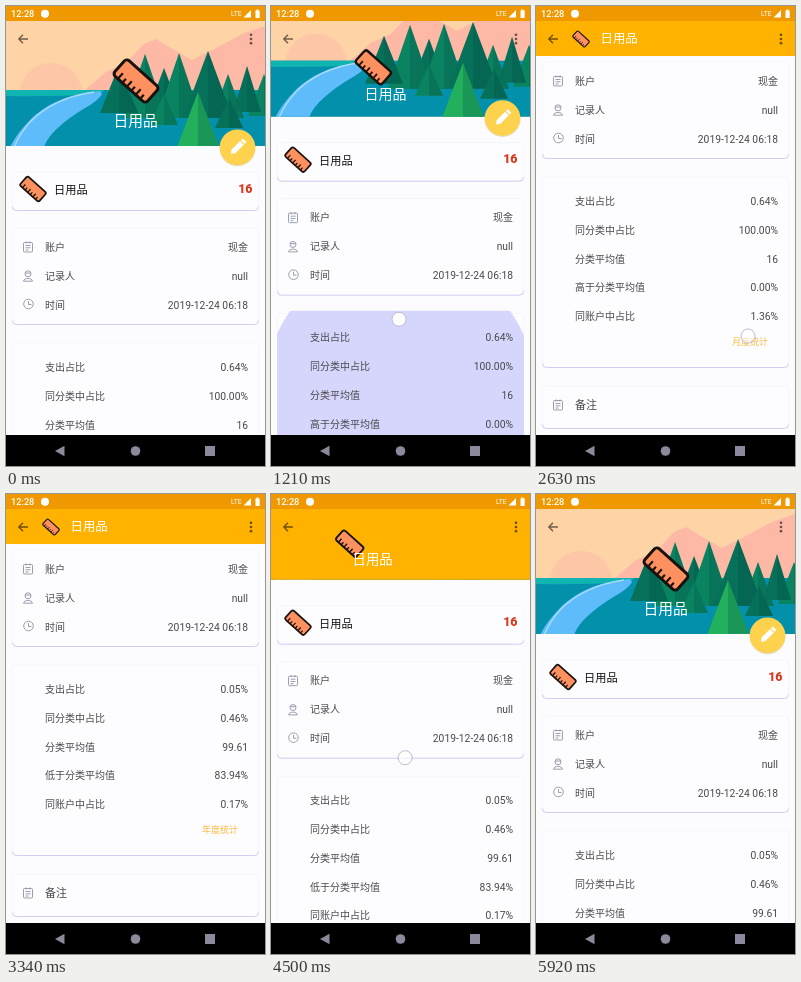
Recreate the animation shown at these times as an HTML page. Size 259 px wide and 460 px high, loop 5.96 s.

```html
<!DOCTYPE html>
<html lang="zh-CN">
<head>
<meta charset="utf-8">
<title>Expense detail</title>
<style>
  html, body { margin: 0; width: 100%; height: 100%; overflow: hidden; background: #fcfcfe; }
  svg { display: block; width: 100%; height: 100%; }
  text { font-family: Roboto, "Noto Sans CJK SC", "Noto Sans CJK", sans-serif; fill: #48484c; }
  .label { font-size: 10px; }
  .value { font-size: 10.3px; text-anchor: end; }
  .cash { font-size: 10px; text-anchor: end; }
  .line { fill: none; stroke: #8f94a8; stroke-width: .9; }
</style>
</head>
<body>
<svg viewBox="0 0 259 460">
  <defs>
    <clipPath id="sceneClip"><rect width="259" height="140"/></clipPath>
    <clipPath id="cardClip"><rect x="6" y="334" width="247" height="194" rx="3"/></clipPath>
    <g id="ruler">
      <g transform="rotate(42)">
        <rect x="-22" y="-10.5" width="44" height="21" rx="3.5" fill="#ff9161" stroke="#19130f" stroke-width="3"/>
        <path d="M-15 10v-7M-9 10v-5M-3 10v-7M3 10v-5M9 10v-7M15 10v-5" stroke="#19130f" stroke-width="2.2"/>
      </g>
    </g>
    <g id="note" class="line">
      <rect x="-4.5" y="-4.5" width="9" height="9.5" rx="1"/>
      <path d="M-2.5 -1.5h5M-2.5 .8h5M-2.5 3h3M-2 -5.5v2M2 -5.5v2"/>
    </g>
  </defs>

  <rect width="259" height="460" fill="#fcfcfe"/>

  <g id="content">
    <g id="cards"></g>
    <g clip-path="url(#cardClip)"><circle id="ripple" fill="#d6d6fd" opacity="0"/></g>

    <use href="#ruler" transform="translate(27 183) scale(.58)"/>
    <text x="48" y="188" style="font-size:11.2px;font-weight:500;fill:#111">日用品</text>
    <text x="246.5" y="186.500" text-anchor="end" style="font-size:12.4px;font-weight:900;fill:#d83a1e">16</text>

    <use href="#note" x="22" y="241"/>
    <g class="line" transform="translate(22 270)">
      <circle cy="-2.2" r="3"/>
      <path d="M-4.5 5.2C-4 1.5 4 1.5 4.5 5.2ZM-3 -3h6"/>
    </g>
    <g class="line" transform="translate(22.5 298)">
      <circle r="4.8"/><path d="M0 -3V.5H3"/>
    </g>
    <use href="#note" x="22" y="565"/>
    <g id="rows"></g>
    <text id="link" x="196" y="505.3" style="font-size:9px;fill:#ffb93c"></text>
    <text x="39" y="569.2" style="font-size:11px">备注</text>
  </g>

  <g id="scene" clip-path="url(#sceneClip)">
    <rect width="259" height="141" fill="#fed4a6"/>
    <circle cx="45" cy="88" r="31" fill="#fdc6a6"/>
    <path d="M78 85L100 66 119 58 138 38 150 33 168 44 186 54 214 40 236 28 259 20V112H110Z" fill="#fdb9a6"/>
    <rect y="84" width="259" height="57" fill="#0290aa"/>
    <path d="M0 84H98L94 88Q45 91 0 90Z" fill="#10b4b0"/>
    <path d="M94 85C62 88 40 98 24 114Q11 127 4 141H38Q42 130 54 120 64 111 79 102 92 95 96 88Z" fill="#5fbcfb"/>
    <path d="M88 86C60 90 40 100 25 115Q14 127 8 141" fill="none" stroke="#a5dbf8" stroke-width="1.5"/>
    <g id="trees"></g>
    <rect id="scrim" width="259" height="141" fill="#ffb300"/>
  </g>

  <g id="fab">
    <circle cy="1" r="18" fill="#d5bd85" opacity=".5"/>
    <circle r="17.8" fill="#ffd24e"/>
    <path transform="rotate(45)" d="M-2.6 -10h5.2v2.6h-5.2zM-2.6 -6.300h5.2V5.800L0 9.200 -2.600 5.800Z" fill="#fff"/>
  </g>

  <path d="M22 33H13.2M17 28.8L12.8 33 17 37.2" fill="none" stroke="#000" stroke-opacity=".56" stroke-width="1.4"/>
  <g fill="#000" fill-opacity=".56">
    <circle cx="245" cy="28.8" r="1.35"/><circle cx="245" cy="33" r="1.35"/><circle cx="245" cy="37.2" r="1.35"/>
  </g>
  <use id="badge" href="#ruler"/>
  <text id="title" style="fill:#fff;font-weight:500">日用品</text>

  <rect width="259" height="15" fill="#f09800"/>
  <text x="5" y="11" style="font-size:9.2px;font-weight:500;fill:#fff">12:28</text>
  <circle cx="39" cy="7.8" r="4" fill="#fff"/>
  <text x="225" y="10.3" style="font-size:6.8px;fill:#fff">LTE</text>
  <path d="M237.5 11.5L245 4V11.5ZM249.5 4.5h1V3.5h2v1h1.2V12h-4.2Z" fill="#fff"/>

  <rect y="429" width="259" height="31" fill="#000"/>
  <g fill="#8b899b">
    <path d="M49 445L58.5 439.8V450.2Z"/>
    <circle cx="129.5" cy="445" r="4.8"/>
    <rect x="199" y="440" width="10" height="10"/>
  </g>

  <circle id="touch" r="7" fill="#fff" stroke="#b4b4d6" stroke-width=".9"/>
</svg>

<script>
const LOOP = 5960, MAX_SCROLL = 166, COLLAPSE = 90, TOGGLE = 2710;
const HIDE = 1292, SHOW = 4505; // header crosses its collapse threshold
const $ = id => document.getElementById(id);
const clamp = (v, lo = 0, hi = 1) => Math.min(hi, Math.max(lo, v));
const mix = (a, b, p) => a + (b - a) * p;
const span = (t, from, to) => clamp((t - from) / (to - from));

function set(id, attrs) {
  for (const name in attrs) $(id).setAttribute(name, attrs[name]);
}

// Linear track through [time, value] points.
function track(points, t) {
  if (t <= points[0][0]) return points[0][1];
  for (let i = 1; i < points.length; i++) {
    const [t0, v0] = points[i - 1], [t1, v1] = points[i];
    if (t <= t1) return mix(v0, v1, (t - t0) / (t1 - t0));
  }
  return points[points.length - 1][1];
}

const cards = [[166, 204.5], [222, 318.5], [337, 527.5], [546, 588.5]];
$('cards').innerHTML = cards.map(([top, bottom]) => `
  <rect x="6.5" y="${top}" width="246" height="${bottom - top}" rx="3" fill="#fdfdff" stroke="#f3f3fd" stroke-width=".8"/>
  <path d="M6.5 ${bottom - 4}q0 4 4 4H248.5q4 0 4 -4" fill="none" stroke="#cfcff3"/>`).join('');

// Apex x, apex y, base y, half width, fill.
const DARK = '#067058', MID = '#0a8460', BRIGHT = '#22b05c';
const trees = [
  [158, 62, 112, 19, DARK], [222, 68, 112, 16, MID], [258, 68, 110, 16, MID],
  [139, 48, 112, 22, MID], [173, 47, 112, 22, MID], [241, 60, 106, 14, DARK],
  [113, 59, 107, 19, DARK], [202, 45, 112, 25, DARK],
  [158, 88, 119, 14, MID], [223, 92, 122, 14, DARK], [192, 86, 141, 21, BRIGHT]
];
$('trees').innerHTML = trees.map(([x, top, base, half, fill]) =>
  `<path d="M${x} ${top}L${x + half} ${base}H${x - half}Z" fill="${fill}"/>
   <path d="M${x} ${top}L${x + half} ${base}H${x}Z" fill="#004a48" opacity=".25"/>`).join('');

const facts = [['账户', '现金', 241, 'cash'], ['记录人', 'null', 270], ['时间', '2019-12-24 06:18', 299]];
const statY = [361, 390, 419, 447.5, 476];
const monthly = {
  link: '月度统计', labels: ['支出占比', '同分类中占比', '分类平均值', '高于分类平均值', '同账户中占比'],
  values: ['0.64%', '100.00%', '16', '0.00%', '1.36%']
};
const yearly = {
  link: '年度统计', labels: ['支出占比', '同分类中占比', '分类平均值', '低于分类平均值', '同账户中占比'],
  values: ['0.05%', '0.46%', '99.61', '83.94%', '0.17%']
};
const row = (label, value, y, kind = 'value') =>
  `<text class="label" x="39" y="${y + 3.8}">${label}</text><text class="${kind}" x="242" y="${y + 3.8}">${value}</text>`;

let shown = null;
function showStats(stats) {
  if (stats === shown) return;
  shown = stats;
  $('rows').innerHTML = facts.map(f => row(...f)).join('') +
    statY.map((y, i) => row(stats.labels[i], stats.values[i], y)).join('');
  $('link').textContent = stats.link;
}

const scrollUp = [[1090, 0], [1150, 8], [1210, 29], [1540, 134], [1610, 154], [1700, MAX_SCROLL]];
const dragDown = [[4170, 146], [4250, 153], [4640, 325], [4790, 339]];

function scrollAt(t) {
  if (t < 4170) return track(scrollUp, t);
  return clamp(MAX_SCROLL - (track(dragDown, t) - 152), 0, MAX_SCROLL);
}

function touchAt(t) {
  if (t >= 1000 && t < 1600) return [mix(127, 139, span(t, 1180, 1540)), 343 - scrollAt(t) * 1.015];
  if (t >= 2570 && t < 2700) return [212, 330];
  if (t >= 4110 && t < 4860) return [mix(156, 115, span(t, 4170, 4790)), track(dragDown, t)];
  return null;
}

function scrimAt(t) {
  return t < SHOW ? span(t, HIDE, HIDE + 600) ** 2 : (1 - span(t, SHOW, SHOW + 600)) ** 2;
}

function draw(t) {
  const scroll = scrollAt(t), lift = Math.min(scroll, COLLAPSE), p = lift / COLLAPSE;
  showStats(t < TOGGLE ? monthly : yearly);

  set('content', { transform: `translate(0 ${-scroll})` });
  set('scene', { transform: `translate(0 ${-lift})` });
  set('scrim', { opacity: scrimAt(t) });

  set('badge', { transform: `translate(${mix(130, 45, p)} ${mix(75, 33, p)}) scale(${mix(1, .375, p)})` });
  const size = mix(14.8, 12.4, p);
  set('title', { x: mix(107.5, 64.5, p), y: mix(114, 32.7, p) + size * .38 });
  $('title').style.fontSize = size + 'px';

  const fab = t < SHOW ? 1 - span(t, HIDE, HIDE + 180) : span(t, SHOW, SHOW + 180);
  set('fab', { transform: `translate(231.5 ${141.3 - lift}) scale(${fab})`, opacity: fab });

  const grow = 1 - (1 - span(t, 1090, 1320)) ** 2.6;
  set('ripple', {
    cx: mix(127, 129.5, grow), cy: mix(343, 425, grow), r: 158 * grow,
    opacity: t < 1090 ? 0 : 1 - span(t, 1225, 1400)
  });

  const touch = touchAt(t);
  set('touch', { visibility: touch ? 'visible' : 'hidden' });
  if (touch) set('touch', { cx: touch[0], cy: touch[1], 'fill-opacity': t > 1090 && t < 1400 ? 1 : .6 });
}

const start = performance.now();
function tick() {
  draw((performance.now() - start) % LOOP);
  requestAnimationFrame(tick);
}
tick();
</script>
</body>
</html>
```
